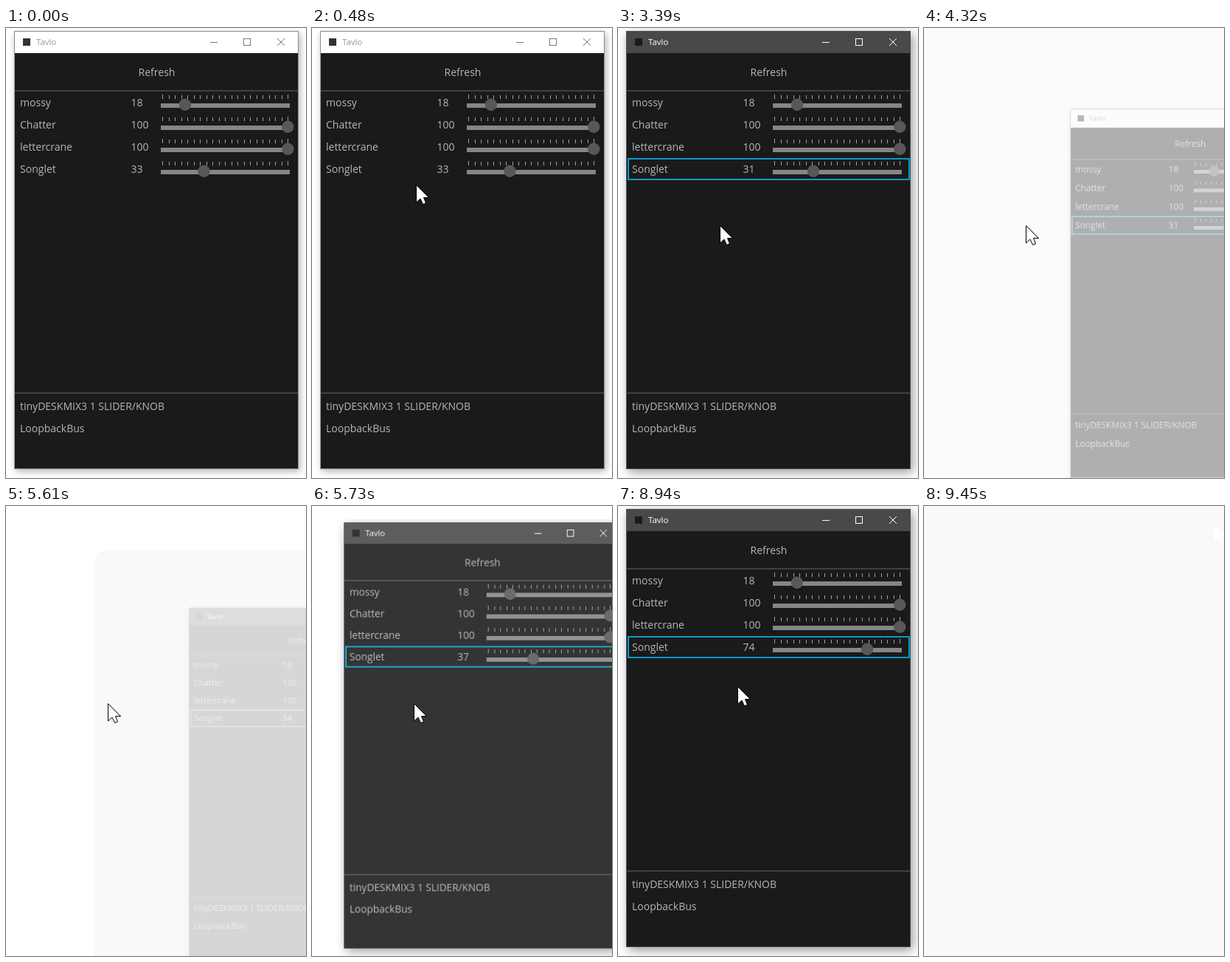
Recreate the animation shown at these times as an HTML page with a canvas. Size 407x609 px, loop 9690 ms.

```html
<!DOCTYPE html>
<html lang="en">
<head>
<meta charset="utf-8">
<title>Volume mixer</title>
<style>
  html, body { margin: 0; width: 100%; height: 100%; overflow: hidden; background: #fff; }
  canvas { display: block; }
</style>
</head>
<body>
<canvas id="stage" width="407" height="609"></canvas>
<script>
const LOOP = 9690, STEP = 30;
const ENTER = 120, CLICK = 870, TURN = 1560, DEACTIVATE = 4110, RESTORE = 5610, END = 9450;
const FONT = '"Open Sans", "Noto Sans", sans-serif';
const TEXT = '#b6b6b6', LINE = '#404040';
// Window animations scale around this point, outside the stage.
const PIVOT = { x: 1197, y: 672 };

const stage = document.getElementById('stage').getContext('2d');
const layer = document.createElement('canvas');
layer.width = 430;
layer.height = 640;
const win = layer.getContext('2d');

const ramp = (t, from, to) => Math.min(1, Math.max(0, (t - from) / (to - from)));
const easeOut = p => 1 - (1 - p) ** 3;
const easeInOut = p => p * p * (3 - 2 * p);
const lerp = (a, b, p) => a + (b - a) * p;

function volumeAt(t) {
  let volume = 33;
  if (t >= TURN) volume += 4 + 11 * ramp(t, TURN, 2040) - 17 * ramp(t, 2310, 3210);
  if (t >= RESTORE) volume += 3 + 18 * ramp(t, RESTORE, 6330);
  volume += 10 * ramp(t, 6600, 7110) + 4 * ramp(t, 7230, 7470) + 8 * ramp(t, 7470, 7830);
  return Math.round(volume);
}

function pointerAt(t) {
  const enter = easeOut(ramp(t, ENTER, 810));
  const leaveRow = ramp(t, 3150, 3390);
  const exit = easeInOut(ramp(t, 8820, END));
  const follow = (a, b, c, d) => Math.round(lerp(lerp(lerp(a, b, enter), c, leaveRow), d, exit));
  return { x: follow(400, 109, 138, 393), y: follow(330, 197, 267, 24) };
}

// 0 when the window is fully open, 1 when it is gone.
function hiddenAt(t) {
  if (t < RESTORE) return ramp(t, 4260, 4350);
  const opening = .844 * Math.exp((RESTORE - t) / 60);
  return Math.max(opening < .015 ? 0 : opening, ramp(t, 9330, END));
}

function box(x, y, w, h, color) {
  win.fillStyle = color;
  win.fillRect(x, y, w, h);
}

function label(text, x, y, color = TEXT, size = 14, align = 'left') {
  win.font = `${size}px ${FONT}`;
  win.textAlign = align;
  win.fillStyle = color;
  win.fillText(text, x, y);
}

function drawFrame(active) {
  win.save();
  win.shadowColor = `rgba(0,0,0,${active ? .42 : .3})`;
  win.shadowBlur = active ? 14 : 9;
  win.shadowOffsetX = active ? 3 : 2;
  win.shadowOffsetY = active ? 4 : 3;
  box(11, 4, 386, 593, active ? '#4a4a4a' : '#8c8c8c');
  win.restore();
  box(12, 34, 384, 562, '#1a1a1a');
}

function drawTitleBar(active) {
  const ink = active ? '#fff' : '#777';
  box(12, 5, 384, 29, active ? '#4b4947' : '#fff');
  box(23, 14, 10, 10, active ? '#1c1b1a' : '#333');
  label('Tavlo', 41, 23, active ? '#fff' : '#999', 11.5);
  box(277, 19, 10, 1, ink);
  win.strokeStyle = ink;
  win.lineWidth = 1;
  win.strokeRect(322.5, 14.5, 9, 9);
  win.beginPath();
  win.moveTo(368, 14);
  win.lineTo(378, 24);
  win.moveTo(378, 14);
  win.lineTo(368, 24);
  win.stroke();
}

function drawSlider(top, value, hover) {
  for (let i = 0; i <= 20; i++) {
    const end = i % 20 === 0;
    box(Math.round(212 + i * 8.5), top + (end ? 4 : 5), 1, end ? 6 : 5, '#a0a0a0');
  }
  box(210, top + 16, 175, 6, '#868686');
  win.fillStyle = hover ? '#525252' : '#585858';
  win.beginPath();
  win.arc(212.3 + value * 1.7, top + 17.8, 8.2, 0, Math.PI * 2);
  win.fill();
}

function drawRow(index, name, value, hover = false) {
  const top = 86 + index * 30;
  const ink = hover ? '#fff' : TEXT;
  if (hover) box(14, top + 2, 381, 27, '#484848');
  label(name, 19, top + 20, ink);
  label(String(value), 169.5, top + 20, ink);
  drawSlider(top, value, hover);
}

function drawWindow(active, selected, hover, volume) {
  win.clearRect(0, 0, layer.width, layer.height);
  drawFrame(active);
  drawTitleBar(active);
  label('Refresh', 204.5, 64.5, TEXT, 14, 'center');
  box(12, 84, 384, 2, LINE);
  drawRow(0, 'mossy', 18);
  drawRow(1, 'Chatter', 100);
  drawRow(2, 'lettercrane', 100);
  drawRow(3, 'Songlet', volume, hover);
  if (selected) {
    win.strokeStyle = '#089ac6';
    win.lineWidth = 2;
    win.strokeRect(14, 177, 381, 28);
  }
  box(12, 493, 384, 2, LINE);
  label('tinyDESKMIX3 1 SLIDER/KNOB', 19, 516.5);
  label('LoopbackBus', 19, 546.5);
}

const ARROW = new Path2D('M.5 .5V24L6 19L9.5 26.5L13.5 25L10.5 17.5H17.5Z');

function drawPointer({ x, y }, outlined) {
  stage.save();
  stage.translate(x, y);
  stage.fillStyle = '#fff';
  stage.fill(ARROW);
  if (outlined) stage.stroke(ARROW);
  stage.restore();
}

// A pale sheet covers the stage while the window is away.
function drawSheet(t, hidden) {
  const fade = ramp(t, RESTORE, RESTORE + 60);
  const lifting = t >= RESTORE && fade < 1;
  const inset = lifting ? 60 + 15 * fade : 0;
  stage.globalAlpha = lifting ? 1 - fade : t < RESTORE || t > 9000 ? hidden : 0;
  stage.fillStyle = '#f9f9f9';
  stage.beginPath();
  stage.roundRect(inset * 2, inset, 500, 700, inset / 4);
  stage.fill();
  stage.globalAlpha = 1;
}

function render(time) {
  const t = Math.floor((time % LOOP) / STEP) * STEP;
  const hidden = hiddenAt(t);
  const scale = 1 - .237 * hidden;
  const pointer = pointerAt(t);
  const active = t >= CLICK && (t < DEACTIVATE || t >= RESTORE);
  const hover = t >= ENTER && t < DEACTIVATE && pointer.y >= 176 && pointer.y < 206;

  stage.fillStyle = '#fff';
  stage.fillRect(0, 0, 407, 609);
  drawSheet(t, hidden);
  if (hidden < 1) {
    drawWindow(active, t >= CLICK, hover, volumeAt(t));
    stage.save();
    stage.globalAlpha = 1 - hidden;
    stage.translate(PIVOT.x * (1 - scale), PIVOT.y * (1 - scale));
    stage.scale(scale, scale);
    stage.drawImage(layer, 0, 0);
    stage.restore();
  }
  if (t >= ENTER) drawPointer(pointer, t < END);
}

let start;
function tick(now) {
  start ??= now;
  render(now - start);
  requestAnimationFrame(tick);
}
render(0);
requestAnimationFrame(tick);
</script>
</body>
</html>
```
